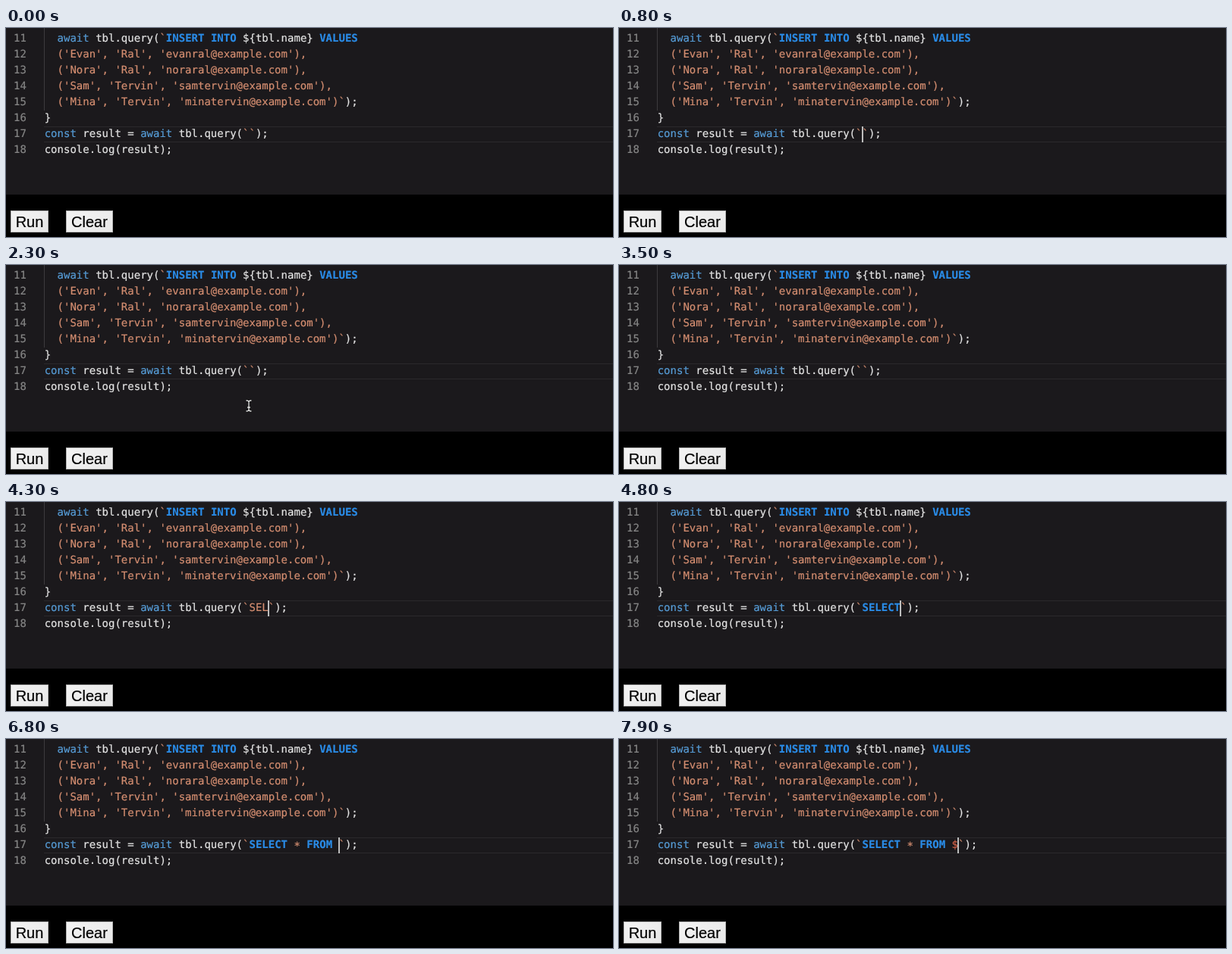
An HTML page that plays this animation: 800 px wide and 276 px high, repeating every 8000 ms.

```html
<!DOCTYPE html>
<html lang="en">
<head>
<meta charset="utf-8">
<title>Query editor</title>
<style>
html, body { margin: 0; width: 100%; height: 100%; overflow: hidden; background: #000; }
#stage { position: relative; width: 800px; height: 276px; overflow: hidden; background: #000; }
#stage > * { position: absolute; box-sizing: border-box; }
#editor { left: 0; top: 0; width: 800px; height: 220px; background: #1b191c; }
#current { left: 50px; top: 130px; width: 750px; height: 21px; border: solid #2b292c; border-width: 1px 0; }
#guide { left: 50px; top: 0; width: 1px; height: 109px; background: #3d3b3e; }
pre {
  margin: 0; top: 4px; color: #e4e4e4; white-space: pre;
  font: 14px/21px "DejaVu Sans Mono", monospace;
  text-rendering: geometricPrecision; font-variant-ligatures: none;
  -webkit-text-stroke: 0.2px currentColor;
}
#numbers { left: 10px; color: #858585; }
#code { left: 50.7px; }
i, b, s, u, em { font-style: normal; text-decoration: none; }
i { color: #569cd6; }
b { color: #2a8be6; }
s { color: #d38d70; }
u { position: relative; top: 2px; }
em { color: #cc5f48; }
#caret { top: 130px; width: 2px; height: 21px; background: #bdbdbd; }
.button {
  top: 241px; height: 29px; border: 1px solid #b4b4b4; color: #000;
  background: linear-gradient(135deg, #f3f3f3, #e8e8e8);
  font: 20px/28px "Liberation Sans", Arial, sans-serif; text-align: center;
  -webkit-text-stroke: 0.2px currentColor;
}
#pointer { left: 0; top: 0; width: 800px; height: 276px; }
</style>
</head>
<body>
<div id="stage">
  <div id="editor"></div>
  <div id="current"></div>
  <div id="guide"></div>
<pre id="numbers">11
12
13
14
15
16
17
18</pre>
<pre id="code">  <i>await</i> tbl.query(<s>`</s><b>INSERT</b> <b>INTO</b> ${tbl.name} <b>VALUES</b>
<s>  ('Evan', 'Ral', 'evanral@example.com'),
  ('Nora', 'Ral', 'noraral@example.com'),
  ('Sam', 'Tervin', 'samtervin@example.com'),
  ('Mina', 'Tervin', 'minatervin@example.com')`</s>);
}
<i>const</i> result = <i>await</i> tbl.query(<s>`<span id="typed"></span>`</s>);
console.log(result);</pre>
  <div id="caret"></div>
  <div class="button" style="left:6px;width:50px">Run</div>
  <div class="button" style="left:79px;width:62px">Clear</div>
  <svg id="pointer" viewBox="0 0 800 276" fill="none">
    <g id="beam" stroke-linecap="round">
      <path d="M-3-7Q0-7 0-5Q0-7 3-7M0-5V5M-3 7Q0 7 0 5Q0 7 3 7M-1.5 2H1.5" stroke="#111" stroke-width="2.6"/>
      <path d="M-3-7Q0-7 0-5Q0-7 3-7M0-5V5M-3 7Q0 7 0 5Q0 7 3 7M-1.5 2H1.5" stroke="#e8e8e8" stroke-width="1.3"/>
    </g>
    <path id="arrow" d="M0 0V14L3.2 11L5.3 16L7.6 15L5.5 10.2H10Z" fill="#000" stroke="#fff"/>
  </svg>
</div>
<script>
const LOOP = 8000, CHAR = 14 * 0.602, LEFT = 50.7, FIRST_COL = 32;
const query = "SELECT * FROM $";
// moment each character of the query is typed
const keys = [4000, 4100, 4200, 4400, 4500, 4600, 5000, 5300, 5600, 5800, 6000, 6100, 6200, 6400, 7600];
// moments that restart the caret's blinking: earlier focus, click, keys
const blinkStarts = [-500, 1600, ...keys];
// time, x, y of the mouse
const path = [
  [900, 327, 236], [1000, 324, 176], [1100, 322, 152], [1200, 322, 147],
  [2000, 322, 147], [2100, 321, 158], [2300, 320, 186], [2400, 320, 204],
  [2500, 320, 232], [2600, 320, 256], [2700, 320, 290]
];
const $ = id => document.getElementById(id);
const typed = $("typed"), caret = $("caret"), beam = $("beam"), arrow = $("arrow");
let shown = -1;

function highlight(text) {
  return text.replace(/SELECT|FROM/g, "<b>$&</b>")
    .replace("*", "<u>*</u>")
    .replace("$", "<em>$$</em>");
}

function mouseAt(t) {
  const k = path.findIndex(p => p[0] > t);
  if (k < 1) return null;
  const [t0, x0, y0] = path[k - 1], [t1, x1, y1] = path[k];
  const u = (t - t0) / (t1 - t0);
  return [x0 + (x1 - x0) * u, y0 + (y1 - y0) * u];
}

function place(el, pos, visible) {
  el.style.display = visible ? "" : "none";
  if (visible) el.setAttribute("transform", `translate(${pos})`);
}

function draw(now) {
  const t = Math.floor(now % LOOP / 100) * 100;
  const count = keys.filter(k => k <= t).length;
  if (count !== shown) {
    shown = count;
    typed.innerHTML = highlight(query.slice(0, count));
    caret.style.left = LEFT + (FIRST_COL + count) * CHAR - 0.5 + "px";
  }
  const since = t - Math.max(...blinkStarts.filter(s => s <= t));
  caret.style.display = since % 1000 < 500 ? "" : "none";

  const pos = mouseAt(t), low = pos && pos[1] > 218;
  place(beam, pos, pos && !low);
  place(arrow, pos, low);
}

function tick() {
  draw(performance.now());
  requestAnimationFrame(tick);
}
tick();
</script>
</body>
</html>
```
